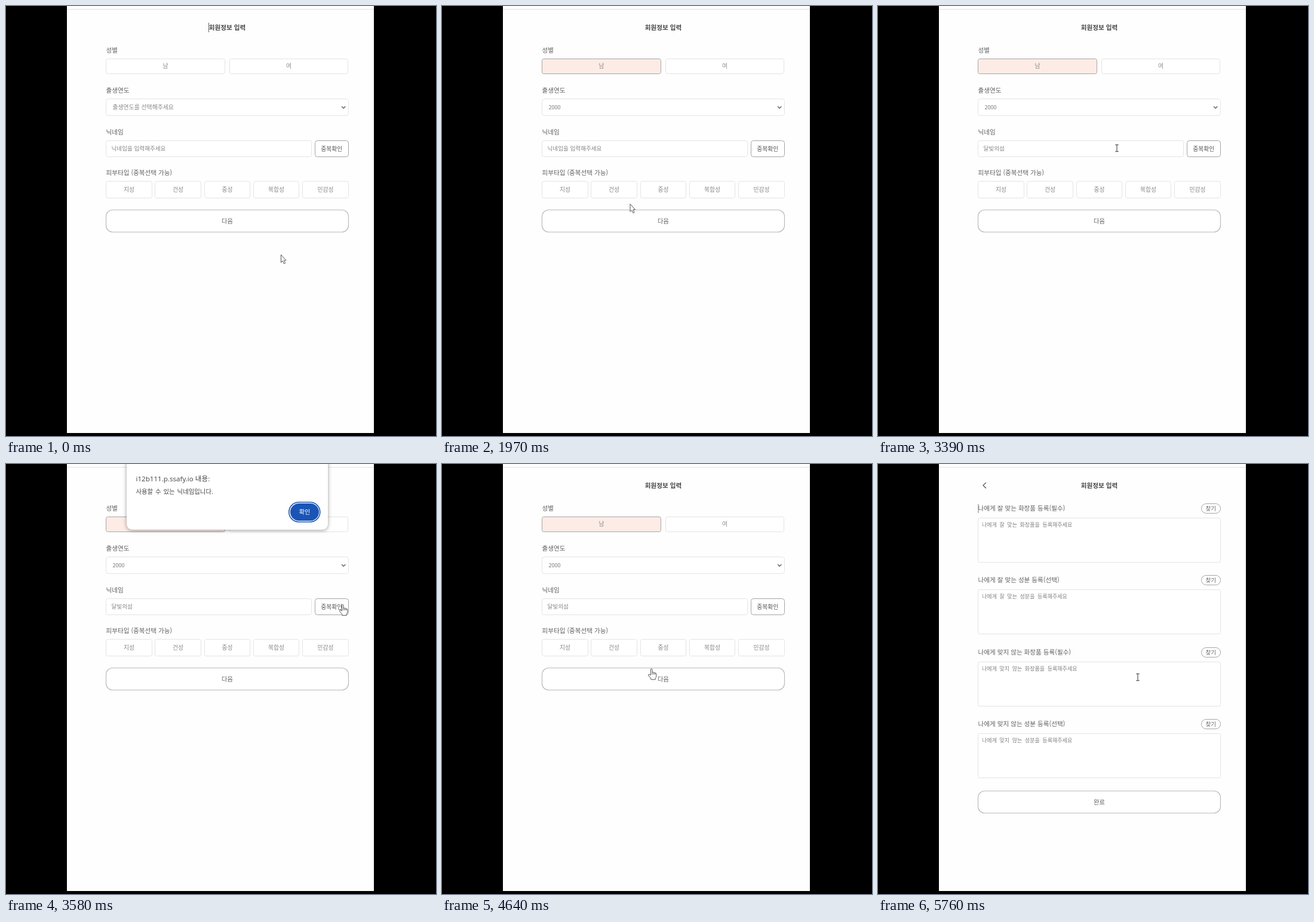
Write an HTML page that moves like this. It is 720 px wide and 720 px high and loops after 5.85 s.

```html
<!DOCTYPE html>
<html lang="ko">
<head>
<meta charset="utf-8">
<title>회원정보 입력</title>
<style>
  html, body { margin: 0; width: 100%; height: 100%; overflow: hidden; background: #000; }
  svg { display: block; width: 720px; height: 720px; }
  text { font-family: "Noto Sans CJK KR", "Noto Sans", sans-serif; white-space: pre; }
  .mono { font-family: "Noto Sans Mono CJK KR", "Noto Sans CJK KR", monospace; }
  .host { font-family: "Open Sans", "Noto Sans CJK KR", sans-serif; }
  .box { fill: #fff; stroke: #e4e4e4; }
  .box.on { fill: #fdece6; stroke: #a9a5a3; }
  .strong { stroke: #a2a4a4; }
  .next { stroke: #b9bcbc; stroke-width: 1.2; }
  .line { fill: none; stroke: #666; stroke-width: 1.5; stroke-linecap: round; stroke-linejoin: round; }
  .pointer { fill: #fff; stroke: #555; stroke-linejoin: round; }
  #dialog .panel { filter: drop-shadow(0 1px 3px #0006); }
</style>
</head>
<body>
<svg id="stage" viewBox="0 0 720 720"></svg>
<script>
const LOOP = 5850;
const TITLE = '회원정보 입력';

// y is the vertical middle of the glyphs
const text = (str, x, y, size, color, extra = '') =>
  `<text x="${x}" y="${(y + size * 0.37).toFixed(2)}" font-size="${size}" fill="${color}" ${extra}>${str}</text>`;
const MID = 'text-anchor="middle"';
const rect = (x1, y1, x2, y2, r, cls = '', id = '') =>
  `<rect id="${id}" class="box ${cls}" x="${x1 + .5}" y="${y1 + .5}" width="${x2 - x1 - 1}" height="${y2 - y1 - 1}" rx="${r}"/>`;
const button = (str, x1, y1, x2, y2, id) =>
  rect(x1, y1, x2, y2, 3, '', id) + text(str, (x1 + x2) / 2, (y1 + y2) / 2 - .3, 9.8, '#888', MID);
const label = (str, y) => text(str, 167.5, y, 10.6, '#606060', 'font-weight="500"');
const title = text(TITLE, 370.5, 36, 10.6, '#444', MID + ' font-weight="700"');
const nextButton = (str, y) =>
  rect(167, y, 574, y + 38, 11, 'next') + text(str, 370.5, y + 19, 10.3, '#666', MID);

const skinTypes = ['지성', '건성', '중성', '복합성', '민감성'];
const profilePage = title +
  label('성별', 74) + button('남', 167, 88, 367, 114, 'male') + button('여', 374, 88, 573, 114) +
  label('출생연도', 141) + rect(167, 155, 574, 184, 4) +
  '<g id="year"></g><path class="line" d="M562.5 168.5l2.7 2.7 2.7-2.7"/>' +
  label('닉네임', 211) + rect(167, 225, 512, 253, 3) + '<g id="nick"></g>' +
  rect(517, 225, 574, 253, 4, 'strong') + text('중복확인', 545.3, 239, 9.8, '#555', MID) +
  label('피부타입 (중복선택 가능)', 279) +
  skinTypes.map((s, i) => button(s, Math.round(167 + i * 82.3), 293, Math.round(244.5 + i * 82.3), 322, 'skin' + i)).join('') +
  nextButton('다음', 341) +
  '<path id="caret" d="M339.5 28V44" stroke="#666"/>';

const items = [
  ['나에게 잘 맞는 화장품', '을', '필수'],
  ['나에게 잘 맞는 성분', '을', '선택'],
  ['나에게 맞지 않는 화장품', '을', '필수'],
  ['나에게 맞지 않는 성분', '을', '선택'],
];
const productPage = title +
  '<path class="line" d="M180.5 31.5l-4.5 4.3 4.5 4.3"/>' +
  items.map(([name, particle, need], i) => {
    const y = Math.round(i * 120.3);
    return label(`${name} 등록(${need})`, y + 74.5) +
      rect(541, y + 66, 574, y + 83, 8, 'strong') + text('찾기', 557.3, y + 74.5, 9.6, '#666', MID) +
      rect(167, y + 90, 574, y + 165, 2) +
      text(`${name}${particle} 등록해주세요`, 174, y + 101.3, 9.05, '#808080', 'class="mono"');
  }).join('') +
  nextButton('완료', 547) +
  '<path d="M168 67V82" stroke="#777"/>';

const dialog =
  '<rect class="panel" x="202" y="-12" width="337" height="122" rx="9" fill="#fff"/>' +
  text('i12b111.p.ssafy.io 내용:', 217.5, 24.3, 11.6, '#444', 'class="host"') +
  text('사용할 수 있는 닉네임입니다.', 217.5, 46.3, 10.4, '#444', 'word-spacing="1"') +
  '<rect id="ring" x="473.8" y="64" width="52" height="33" rx="16.5" fill="#fff" stroke="#1a55b5" stroke-width="1.6"/>' +
  '<rect x="476" y="66" width="48" height="29" rx="14.5" fill="#1a55b5"/>' +
  text('확인', 500, 80.3, 10.2, '#fff', MID);

const pointers =
  '<path id="arrow" class="pointer" d="M.5 .5V13.5L3.3 10.8 5.4 15.6 7.6 14.6 5.5 9.9H9Z"/>' +
  '<path id="hand" class="pointer" d="M-1.6 11V1.6Q-1.5 .4 -.3 .4T1 1.6V6.2Q2.4 5.3 3.4 6.8 5 6 5.7 7.5 7.7 7 7.8 9V13Q7.6 15 6.2 16.2V18.4H-1.2V16.6L-5.4 11.5Q-5.8 9.6 -4 9.6ZM1 6.2V10M3.4 6.8V10M5.7 7.5V10"/>' +
  '<path id="beam" d="M-2.7-5.7H-.7L0-5 .7-5.7H2.7M0-5V5M-2.7 5.7H-.7L0 5 .7 5.7H2.7" fill="none" stroke="#555" stroke-width="1.2"/>';

document.getElementById('stage').innerHTML =
  '<clipPath id="clip"><path d="M102 0H616V715H102Z"/></clipPath>' +
  '<g clip-path="url(#clip)"><path d="M102 0H616V715H102Z" fill="#fefefe"/>' +
  '<path d="M102 5.5H616" stroke="#e3e3e3"/>' +
  `<g id="profile">${profilePage}</g><g id="product">${productPage}</g>` +
  `<g id="dialog">${dialog}</g><g id="pointer">${pointers}</g></g>`;

const $ = id => document.getElementById(id);
const show = (id, on) => $(id).setAttribute('visibility', on ? 'inherit' : 'hidden');
const between = (t, a, b) => t >= a && t < b;
const ramp = (t, a, b) => Math.min(1, Math.max(0, (t - a) / (b - a)));

// [time, x, y, shape]: the pointer holds each place until the next
const track = [
  [0, 460, 416, 'arrow'], [210, 465, 413, 'arrow'], [300, 470, 411, 'arrow'], [390, 471.5, 410, 'arrow'],
  [550, 440, 350, 'arrow'], [610, 370, 200, 'arrow'], [700, 319.7, 97, 'hand'],
  [1640, 318, 118, 'hand'], [1670, 315, 145, 'arrow'], [1700, 312, 166, 'arrow'],
  [1880, 312, 205, 'arrow'], [1940, 313, 270, 'arrow'], [1970, 314.5, 331, 'arrow'],
  [2210, 230.5, 253, 'arrow'], [2360, 235, 244, 'beam'], [2390, 240, 234, 'beam'],
  [3360, 290, 236, 'beam'], [3390, 400, 238, 'beam'], [3420, 510, 237, 'beam'], [3450, 564, 235, 'hand'],
  [3670, 558, 210, 'hand'], [3700, 545, 178, 'arrow'], [3730, 532, 145, 'arrow'],
  [3760, 520, 115, 'arrow'], [3790, 511, 92, 'arrow'], [3820, 506, 80, 'arrow'],
  [3970, 507, 88, 'arrow'], [4000, 508.5, 103, 'hand'], [4030, 504, 130, 'arrow'],
  [4090, 495, 170, 'arrow'], [4180, 488.5, 199, 'arrow'], [4390, 351, 342.5, 'hand'],
  [4910, 340, 325, 'hand'], [5000, 326, 307.5, 'hand'],
  [5180, 321, 308, 'hand'], [5240, 317, 308, 'hand'], [5760, 435, 357, 'beam'],
];

// Each keystroke of the nickname as the input method composes it
const strokes = ['ㄷ', '다', '달', '달ㅂ', '달비', '달빛', '달빛ㅇ', '달빛의', '달빛의ㅅ', '달빛의서', '달빛의섬'];
const NICK_X = 176.5, NICK_SIZE = 9.6, GLYPH = NICK_SIZE * 0.92;

function nickname(t) {
  const n = Math.floor((t - 2410) / 45);
  const typed = n < 0 ? '' : strokes[Math.min(n, strokes.length - 1)];
  const end = NICK_X + typed.length * GLYPH;
  let out = text(typed || '닉네임을 입력해주세요', NICK_X, 238.7, NICK_SIZE, '#858585');
  if (typed && t < 3090) out += `<path d="M${end - GLYPH} 244H${end}" stroke="#888"/>`;
  if (between(t, 2390, 2910)) out += `<path d="M${end + .3} 233V245" stroke="#777"/>`;
  return out;
}

const cache = {};
function fill(id, html) {
  if (cache[id] !== html) $(id).innerHTML = cache[id] = html;
}

function render(t) {
  show('profile', t < 5760);
  show('product', t >= 5760);
  show('caret', t < 300 || between(t, 550, 700) || between(t, 1090, 1360));
  $('male').classList.toggle('on', t >= 1610);
  $('skin1').classList.toggle('on', t >= 5390);
  fill('year', t < 1970
    ? text('출생연도를 선택해주세요', 178.5, 169.3, 9.86, '#888')
    : text('2000', 178.5, 169.3, 9, '#777'));
  fill('nick', nickname(t));

  const opening = ramp(t, 3480, 3570), closing = ramp(t, 3970, 4110);
  const shown = opening * (1 - closing);
  show('dialog', shown > 0);
  show('ring', shown > 0 && closing === 0);
  $('dialog').setAttribute('opacity', shown);
  $('dialog').setAttribute('transform', `translate(0 ${-16 * (1 - opening) - 19 * closing})`);

  const [, x, y, shape] = track.findLast(k => k[0] <= t);
  for (const id of ['arrow', 'hand', 'beam']) show(id, id === shape);
  $('pointer').setAttribute('transform', `translate(${x} ${y})`);
}

const start = performance.now();
function frame() {
  render((performance.now() - start) % LOOP);
  requestAnimationFrame(frame);
}
frame();
</script>
</body>
</html>
```
